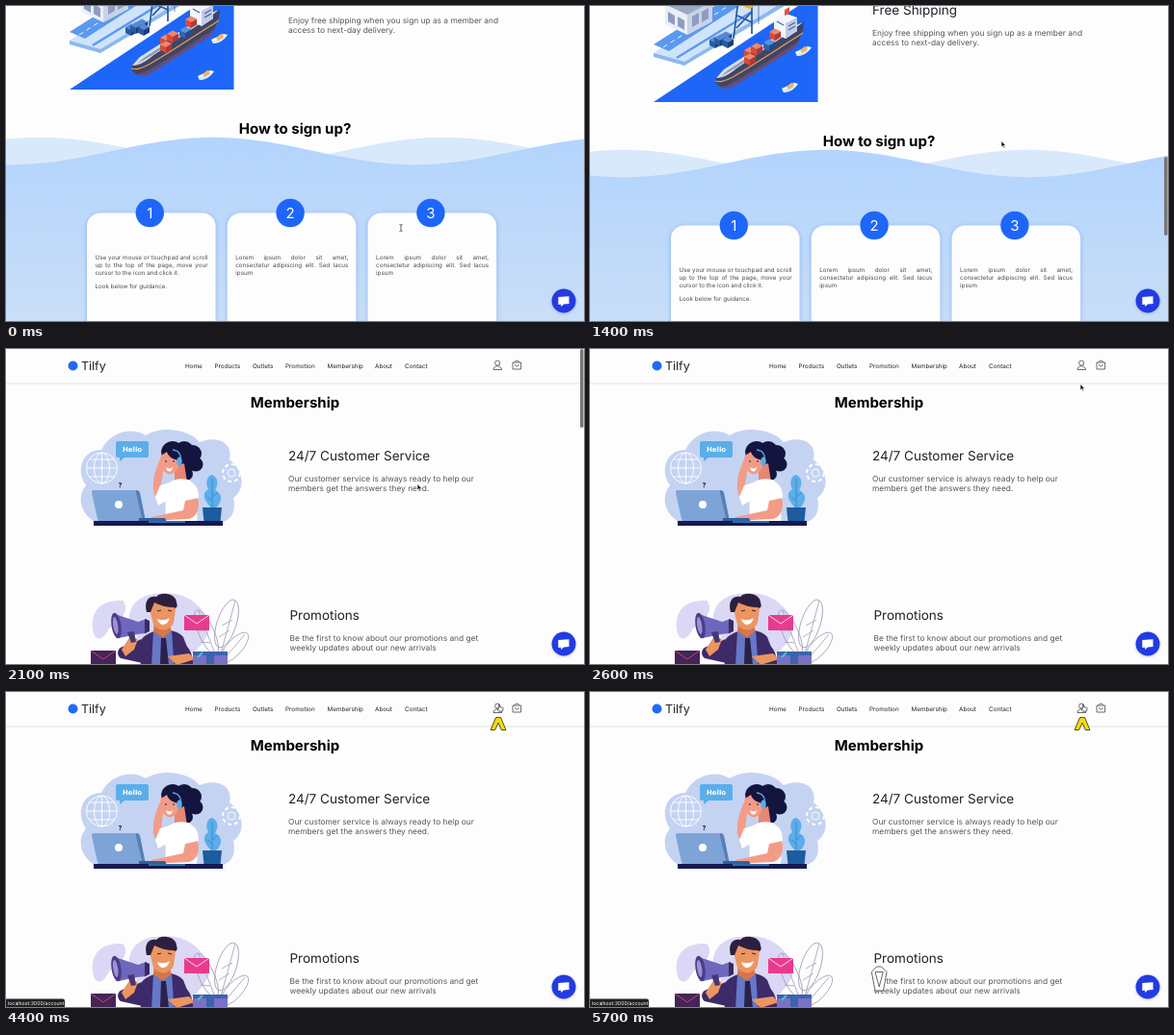
These frames come from a looping animation (600x328 px, 5800 ms). An HTML page:

```html
<!DOCTYPE html>
<html lang="en">
<head>
<meta charset="utf-8">
<title>Membership</title>
<style>
html, body { margin: 0; width: 100%; height: 100%; overflow: hidden; background: #fdfdfd; }
body { position: relative; font-family: Inter, sans-serif; text-rendering: geometricPrecision; }
svg { position: absolute; left: 0; top: 0; display: block; }
#page { position: absolute; left: 0; top: 0; width: 600px; height: 1312px; }
.title { font-size: 15px; font-weight: 700; text-anchor: middle; fill: #000; }
.head { font-size: 13.5px; fill: #202124; }
.body { font-size: 8.35px; fill: #55585c; }
.nav { font-size: 6.35px; fill: #222; }
.num { font-size: 15px; fill: #fff; text-anchor: middle; }
.card { position: absolute; top: 898.6px; width: 117px; font-size: 6.25px; line-height: 8px; color: #4c4c4c; text-align: justify; }
.card p { margin: 0 0 6px; }
</style>
</head>
<body>
<div id="page">
<svg width="600" height="1312">
  <defs>
    <linearGradient id="sea" gradientUnits="userSpaceOnUse" x1="0" y1="785" x2="0" y2="1010">
      <stop offset="0" stop-color="#b3d4fd"/><stop offset="1" stop-color="#cfe1f6"/>
    </linearGradient>
    <filter id="soft" x="-20%" y="-20%" width="140%" height="140%">
      <feDropShadow dx="0" dy="1" stdDeviation="2.5" flood-color="#4b8ce0" flood-opacity=".55"/>
    </filter>
    <clipPath id="photo"><rect x="66" y="557" width="170.500" height="171"/></clipPath>
  </defs>

  <!-- header -->
  <path d="M0 36H600" stroke="#e3e4e6"/>
  <circle cx="69.5" cy="17.5" r="5" fill="#1f6bf5"/>
  <text x="78" y="22" font-size="12.5" fill="#222">Tilfy</text>
  <g id="nav" class="nav"></g>
  <g fill="none" stroke="#444" stroke-width=".8">
    <circle cx="510.2" cy="14.6" r="2.6"/>
    <path d="M506 21.5c0-5 8.5-5 8.5 0zM526 14h8.6v7h-8.6zM528 14c0-2.500 4.600-2.500 4.600 0M528.500 16.200c0 2.500 3.600 2.500 3.600 0"/>
  </g>
  <text class="title" x="300" y="60.500">Membership</text>

  <!-- support agent -->
  <g>
    <path d="M92 180C76 170 74 153 83 142C72 126 79 105 99 105C107 88 129 80 145 90C162 79 191 84 201 97C221 89 236 99 232 115C247 126 249 146 236 155C239 170 234 177 225 180Z" fill="#c4d3f2"/>
    <g fill="none" stroke="#fff" stroke-width=".9">
      <circle cx="99.500" cy="124" r="16"/><ellipse cx="99.500" cy="124" rx="8" ry="16"/>
      <path d="M83.500 124h32M99.500 108v32M86 115h27M86 133h27"/>
      <circle cx="234" cy="129" r="4"/><circle cx="234" cy="129" r="9" stroke-width="2" stroke-dasharray="4 3"/>
    </g>
    <path d="M116 96h30q2 0 2 2v13q0 2-2 2h-23l-5 4v-4h-2q-2 0-2-2V98q0-2 2-2z" fill="#5baeea"/>
    <text x="131" y="107.300" text-anchor="middle" font-family="DejaVu Sans, sans-serif" font-weight="700" font-size="7" fill="#fff">Hello</text>
    <path d="M204 165h20l-1.500 15h-17z" fill="#1d5c9f"/>
    <path d="M213 165C203 155 205 149 210 146C206 139 210 130 214 131C220 134 221 140 217 147C225 150 225 159 218 165Z" fill="#5baeea"/>
    <path d="M214 135V165M214 154l5-4M214 158l-5-4" fill="none" stroke="#2f7fc4" stroke-width=".7"/>
    <g fill="#13153f">
      <circle cx="173" cy="108" r="12"/><circle cx="185" cy="106" r="10"/><circle cx="194" cy="109" r="9"/>
      <circle cx="197" cy="120" r="7.500"/><circle cx="186" cy="120" r="10"/><circle cx="187" cy="130" r="7"/>
    </g>
    <path d="M175 123l10-4 3 20-13 3z" fill="#e88673"/>
    <path d="M161 109C166 103 177 105 180 111L179 122C176 131 168 133 164 127C161 122 160 115 161 109Z" fill="#f29c88"/>
    <path d="M161 111C164 101 176 101 183 110L180 116C172 115 168 111 167 107Z" fill="#13153f"/>
    <path d="M165 117h2M173 117h2" stroke="#13153f"/>
    <path d="M166 123q4 3 7 0q-1 5-4 4.500q-2-.5-3-4.500z" fill="#fff"/>
    <path d="M165 144C170 136 180 134 189 136C197 139 200 153 198 179H166Z" fill="#fff"/>
    <path d="M166 145L155 153C151 146 153 132 157 122L162 109L164 121L161 142Z" fill="#f29c88"/>
    <path d="M155 154l5-12 10-3v17l-12 7z" fill="#fff"/>
    <path d="M187 153L198 151C202 164 200 174 190 177L151 179V175L184 168Z" fill="#f29c88"/>
    <path d="M183 139C194 135 200 143 200 155L186 158Z" fill="#fff"/>
    <path d="M173 105C182 106 183 114 179 120" fill="none" stroke="#5baeea" stroke-width="1.300"/>
    <ellipse cx="180" cy="117" rx="2.700" ry="4.500" fill="#5baeea"/>
    <path d="M91 147h44q3 0 4 3l6 30H98q-2 0-3-3l-6-27q-.5-3 2-3z" fill="#7ea4d7"/>
    <path d="M135 147q3 0 4 3l6 30h-3l-7-30z" fill="#577fb8"/>
    <path d="M138 176h27l2 4h-29z" fill="#315f9f"/>
    <circle cx="117" cy="162" r="4" fill="#fff"/>
    <path d="M91 179h134v5H91z" fill="#151a4e"/>
    <path d="M148 179h38v2h-38z" fill="#2d6dac"/>
    <text x="116.500" y="143.500" font-size="7" font-weight="700" fill="#13153f">?</text>
  </g>
  <text class="head" x="293" y="116">24/7 Customer Service</text>
  <text class="body" x="293" y="138">Our customer service is always ready to help our</text>
  <text class="body" x="293" y="148">members get the answers they need.</text>

  <!-- promoter -->
  <g>
    <path d="M90 291C88 272 99 261 121 262C130 271 118 285 107 291C100 306 91 304 90 291ZM128 285C126 264 143 253 164 255C181 252 198 262 207 277C218 289 205 309 192 318H145Z" fill="#dad8f5"/>
    <g fill="none" stroke="#a09cb5" stroke-width=".8">
      <ellipse cx="229" cy="286" rx="10" ry="26" transform="rotate(18 229 286)"/>
      <ellipse cx="237" cy="311" rx="8" ry="20" transform="rotate(42 237 311)"/>
      <ellipse cx="208" cy="295" rx="8" ry="25" transform="rotate(-24 208 295)"/>
      <path d="M238 262L220 328M248 297L222 328M200 273L221 328M224 288l11-6M221 300l11-7M207 293l-8 0M212 306l-10-1"/>
    </g>
    <path d="M141 302C149 292 173 288 184 300L195 328 193 368H138Z" fill="#3d2a69"/>
    <path d="M153 293l10 8 9-9 5 76h-28z" fill="#6678c8"/>
    <path d="M161 301h5l3 28-5 7-4-7z" fill="#2b2149"/>
    <path d="M154 281h17v13l-8 7-10-7z" fill="#d97548"/>
    <path d="M148 267C150 258 174 258 176 270L174 285C170 294 159 295 153 287Z" fill="#ec9561"/>
    <path d="M146 274C143 263 148 256 156 258C160 252 177 254 177 264C179 269 176 271 174 269C167 269 160 267 154 264L150 274Z" fill="#2c203e"/>
    <path d="M157 273l4-1M168 272l4 1" stroke="#2c203e"/>
    <path d="M157 281q7 3 13-1q-2 7-7 7q-4 0-6-6z" fill="#fff"/>
    <path d="M141 302L121 310C116 311 114 318 119 322L146 328Z" fill="#3d2a69"/>
    <path d="M120 313l9-14 8 3-4 11-9 7z" fill="#ec9561"/>
    <path d="M113 276L137 284 146 281V296L136 297 117 301Z" fill="#6e67bd"/>
    <path d="M126 295l7-1 2 11-5 1z" fill="#443775"/>
    <ellipse cx="114.500" cy="288" rx="5" ry="13.500" transform="rotate(-9 114.500 288)" fill="#4b3c86"/>
    <ellipse cx="113.700" cy="288" rx="2.500" ry="9" transform="rotate(-9 113.700 288)" fill="#9b91d5"/>
    <path d="M144 281l5 2v11l-5 2z" fill="#382b61"/>
    <path d="M185 277h26v16h-26z" fill="#e83b8d"/>
    <path d="M185 277l13 9 13-9" fill="none" stroke="#fff" stroke-width=".8"/>
    <path d="M88 314h26v16H88z" fill="#452456"/>
    <path d="M88 314l13 9 13-9" fill="none" stroke="#e24b99" stroke-width=".8"/>
    <path d="M180 306q12 2 14 19l-11 8z" fill="#3d2a69"/>
    <path d="M168 320l22-3 6 6-19 6z" fill="#ec9561"/>
    <path d="M194 315h36v34h-36z" fill="#7871c7"/>
    <path d="M208 315h8v34h-8zM194 315h36v4h-36z" fill="#3c63ad"/>
    <path d="M199 321l5-5" stroke="#50c4bc" stroke-width="2"/>
    <path d="M95 367h140" stroke="#392b66" stroke-width="1.500"/>
  </g>
  <text class="head" x="294.500" y="282">Promotions</text>
  <text class="body" x="294.500" y="304">Be the first to know about our promotions and get</text>
  <text class="body" x="294.500" y="314">weekly updates about our new arrivals</text>

  <!-- harbour -->
  <g clip-path="url(#photo)">
    <path d="M66 728L237 614V728Z" fill="#1d66f8"/>
    <path d="M66 677L152 620 237 566V607L98 690Z" fill="#cfe4fb"/>
    <path d="M66 677L98 686 237 602V607L98 690 66 681Z" fill="#8cb8ec"/>
    <path d="M66 668L148 616 164 622 82 675Z" fill="#5b98ef"/>
    <path d="M76 671l80-51" stroke="#fff" stroke-width=".9" stroke-dasharray="5 4"/>
    <path d="M90 682l78-48" stroke="#5b98ef" stroke-width="2.500"/>
    <path d="M78 625l24-14 25 11v22l-26 14-23-11z" fill="#e9eef8"/>
    <path d="M101 635l26-13v22l-26 14z" fill="#c9d3e4"/>
    <path d="M75 625l27-16 27 13-28 15z" fill="#9aa9c6"/>
    <path d="M81 634l7 4v10l-7-4zM91 639l7 4v10l-7-4zM106 639l7-4v11l-7 4zM116 634l7-4v11l-7 4z" fill="#8e9cc4"/>
    <g id="boxes"></g>
    <path d="M130 707C130 703 133 699 138 696L206 652C213 649 218 646 222 644C222 658 216 669 203 677L152 709C142 715 133 713 130 707Z" fill="#3d4666"/>
    <path d="M132 711C141 714 148 709 218 664C214 671 209 674 203 678L152 710C143 715 136 715 132 711Z" fill="#694c78"/>
    <path d="M130 706C140 709 147 704 221 656" fill="none" stroke="#f39a4c" stroke-width="1.200"/>
    <path d="M131 703L139 694 206 651 221 645 212 652 152 693C145 699 138 703 131 703Z" fill="#d7deea"/>
    <path d="M135 702L143 695 203 656 210 652 152 692Z" fill="#8d98b1"/>
    <path d="M191 641l10-6 14 5v14l-12 8-12-6z" fill="#f3f6fc"/>
    <path d="M203 646l12-6v14l-12 8z" fill="#c1cce1"/>
    <path d="M194 644l7 4M206 649l7-4M206 653l7-4" stroke="#3f67a9" stroke-width="1.200"/>
    <path d="M202 632l5-3v7l-5 2z" fill="#e45443"/>
    <g id="cargo"></g>
    <g fill="none" stroke="#28589c" stroke-width="1.700">
      <path d="M149 662l5-41 14 5v31M154 621v-12l27 12M153 638l15 7M152 651l16-17"/>
    </g>
    <path d="M150 620l5-3 15 7v5l-5 2-15-7z" fill="#efb532"/>
    <path d="M175 620v27" stroke="#405780" stroke-width=".7"/>
    <g id="boats"></g>
  </g>
  <text class="head" x="293" y="637">Free Shipping</text>
  <text class="body" x="293" y="659">Enjoy free shipping when you sign up as a member and</text>
  <text class="body" x="293" y="669">access to next-day delivery.</text>

  <!-- sign-up steps -->
  <text class="title" x="300" y="773.500">How to sign up?</text>
  <path id="farWave" fill="#d9e9fc"/>
  <path id="nearWave" fill="url(#sea)"/>
  <g id="steps"></g>
</svg>
</div>

<svg id="overlay" width="600" height="328">
  <rect id="thumb" x="596" width="3.500" height="82" rx="1.700" fill="#777"/>
  <g id="status">
    <path d="M0 319.500h59q2 0 2 2v6.500H0z" fill="#202124"/>
    <text x="2" y="325.800" font-size="5.200" fill="#fff">localhost:3000/account</text>
  </g>
  <path id="mark" d="M508.500 26.500h5l5.500 13h-4.700L511 32l-3.300 7.500H503z" fill="#f7d90b" stroke="#45411f" stroke-width=".9"/>
  <path id="ghost" fill="#fff" stroke="#555" stroke-width=".9"/>
  <filter id="lift" x="-30%" y="-30%" width="160%" height="160%"><feDropShadow dx="0" dy="1" stdDeviation="1.500" flood-opacity=".2"/></filter>
  <circle cx="579" cy="307" r="12.500" fill="#213be4" filter="url(#lift)"/>
  <path d="M573.300 303l11.200-.7v7.800l-5.500.4-2.800 2.500-.2-2.300-2.700.2z" fill="#fff"/>
  <path id="cursor" stroke-width=".7"/>
</svg>

<script>
const $ = id => document.getElementById(id);

$('nav').innerHTML = [['Home', 186], ['Products', 216.5], ['Outlets', 256], ['Promotion', 290],
  ['Membership', 333.5], ['About', 383], ['Contact', 414]]
  .map(([name, x]) => `<text x="${x}" y="19.700">${name}</text>`).join('');

// Isometric container: top, left and right faces.
const crate = (x, y, top, left, right) =>
  `<g transform="translate(${x} ${y})"><path d="M0 0l6-3.500 6 3-6 3.500z" fill="${top}"/>
   <path d="M0 0l6 3v6l-6-3z" fill="${left}"/><path d="M6 3l6-3.500v6L6 9z" fill="${right}"/></g>`;
$('boxes').innerHTML = [[124, 663], [135, 658], [129, 661], [137, 663]]
  .map(([x, y]) => crate(x, y, '#5788d5', '#285aa4', '#193e7c')).join('');
$('cargo').innerHTML = [[160, 674], [167, 670], [160, 681], [180, 666], [186, 655]]
  .map(([x, y], i) => i == 3 ? crate(x, y, '#5a91df', '#2f64b2', '#214c8d')
    : crate(x, y, '#f08765', '#d94a3a', '#b23936')).join('');
$('boats').innerHTML = [[199, 712], [213, 674]].map(([x, y]) =>
  `<g transform="translate(${x} ${y})"><path d="M0 2L13-4 17-3C14 2 8 6 2 6Z" fill="#fff"/>
   <path d="M1 4L16-2C13 2 8 6 2 6Z" fill="#d8e5f4"/><path d="M5 0l5-4 3 1-1 3-5 3z" fill="#efb65e"/></g>`).join('');

const lorem = '<p>Lorem ipsum dolor sit amet, consectetur adipiscing elit. Sed lacus ipsum</p>';
const guide = '<p>Use your mouse or touchpad and scroll up to the top of the page, move your cursor to the icon and click it.</p><p>Look below for guidance.</p>';
[guide, lorem, lorem].forEach((copy, i) => {
  const x = 84 + i * 145.8;
  $('steps').innerHTML += `<rect x="${x}" y="856.500" width="133.500" height="210" rx="14" fill="#fdfdfd" filter="url(#soft)"/>
    <circle cx="${x + 65.3}" cy="856.500" r="14.700" fill="#1d66f8"/>
    <text class="num" x="${x + 65.3}" y="862">${i + 1}</text>`;
  $('page').insertAdjacentHTML('beforeend', `<div class="card" style="left:${x + 8.5}px">${copy}</div>`);
});

const cursors = {
  beam: ['M-1.500-3.500Q0-3.500 0-2.500Q0-3.500 1.500-3.500M0-2.500V2.500M-1.500 3.500Q0 3.500 0 2.500Q0 3.500 1.500 3.500', 'none', '#222'],
  arrow: ['M0-3.500V3L1.500 1.600 2.500 4 3.600 3.500 2.600 1.200H4.500Z', '#000', '#fff'],
  hand: ['M-1.500 3.500L-3 1Q-3 0-1.700 1V-3Q-1-4-.4-3V-1L2.500-.3Q3.300 0 3 1.600L2.200 3.700Z', '#fff', '#222']
};
const chevron = 'M298 285.500h4.200l6.300 13h-4.300L300.200 290l-3.700 8.500H292z';
const pointer = 'M297.500 286h5L308 291.500 304.500 311H296L292.300 291.500ZM296 291.500h8.300L300.200 307Z';

const scrollKeys = [[0, 641], [1200, 641], [1300, 638], [1400, 628], [1500, 535], [1600, 290], [1700, 70], [1800, -4], [2000, -1], [2100, 0]];
const xKeys = [[600, 410], [1200, 427], [2200, 427], [2600, 509], [2900, 513]];
const yKeys = [[600, 231], [1200, 144], [2200, 144], [2600, 40], [2900, 16.5]];

function at(keys, t) {
  const i = keys.findIndex(k => k[0] > t);
  if (i < 0) return keys[keys.length - 1][1];
  if (!i) return keys[0][1];
  const [t0, a] = keys[i - 1], [t1, b] = keys[i];
  return a + (b - a) * (t - t0) / (t1 - t0);
}
const show = (id, on) => $(id).style.opacity = +on;

// Sine-edged area whose crest sits at x = crest.
function wave(id, crest) {
  let d = 'M0 1312';
  for (let x = 0; x <= 600; x += 10) d += `L${x} ${792 - 14.2 * Math.cos((x - crest) * 2 * Math.PI / 419)}`;
  $(id).setAttribute('d', d + 'V1312Z');
}

function draw(now) {
  const t = Math.floor(now % 5800 / 100) * 100;
  const scroll = at(scrollKeys, t);
  $('page').style.transform = `translateY(${-scroll}px)`;
  wave('farWave', 35);
  wave('nearWave', 215 + t * 0.0214);
  $('thumb').setAttribute('y', Math.max(0, scroll / 4));
  show('thumb', at([[1200, 0], [1300, 1], [2200, 1], [2500, 0]], t));
  show('status', t >= 2900);
  show('mark', t >= 3300);
  show('ghost', t >= 5000);
  $('ghost').setAttribute('d', t < 5500 ? chevron : pointer);
  $('ghost').setAttribute('fill-opacity', t < 5500 ? .6 : 1);

  const [d, fill, stroke] = cursors[t < 800 ? 'beam' : t < 2900 ? 'arrow' : 'hand'];
  const cursor = $('cursor');
  cursor.setAttribute('d', d);
  cursor.setAttribute('fill', fill);
  cursor.setAttribute('stroke', stroke);
  cursor.setAttribute('transform', `translate(${at(xKeys, t)} ${at(yKeys, t)})`);
}
const start = performance.now();
function tick() {
  draw(performance.now() - start);
  requestAnimationFrame(tick);
}
tick();
</script>
</body>
</html>
```
